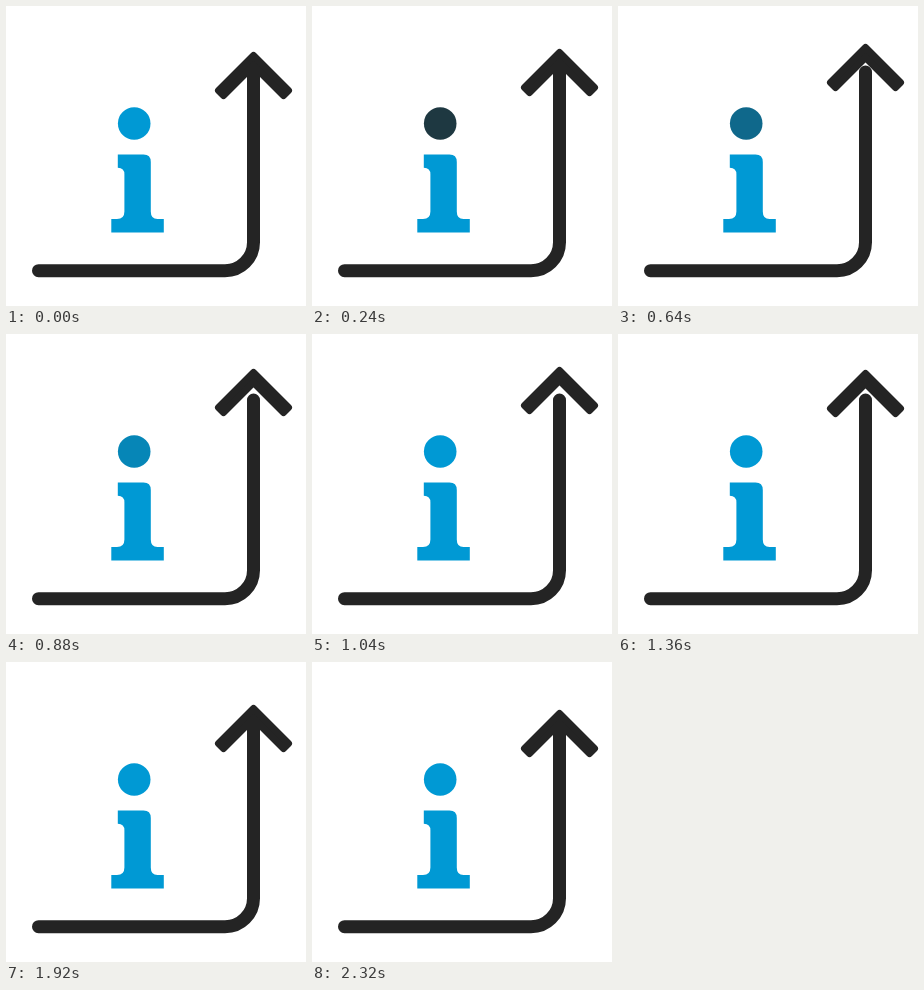
Animation, 300 px wide and 300 px high, one loop 2.4 s. Source, as an HTML page:

```html
<!DOCTYPE html>
<html lang="en">
<head>
<meta charset="utf-8">
<title>Info arrow</title>
<style>
  html, body { margin: 0; width: 100%; height: 100%; overflow: hidden; background: #fff; }
  svg { display: block; width: 100%; height: 100%; }
</style>
</head>
<body>
<svg viewBox="0 0 300 300">
  <g fill="#0099d4">
    <circle id="dot" cx="128.2" cy="117.5" r="16.3"/>
    <path d="M111.8 148.6H137.5Q144.8 148.6 144.8 156V205.5Q144.8 213 151.5 213H157.8V226.4H105.3V213H111Q118.4 213 118.4 205.5V168.5Q118.4 161.8 111.8 161.8Z"/>
  </g>
  <g stroke="#242424" stroke-linejoin="round">
    <path d="M32.5 264.7H219A28.5 28.5 0 0 0 247.5 236.2V66" fill="none" stroke-width="13" stroke-linecap="round"/>
    <path id="head" d="M247.5 49.5L282.5 84.5L277.5 89.5L247.5 59.5L217.5 89.5L212.5 84.5Z" fill="#242424" stroke-width="7"/>
  </g>
</svg>
<script>
  const STEP = 80, STEPS = 30, TOP = 13;
  const dark = [36, 36, 36], blue = [0, 153, 212];
  const dot = document.getElementById("dot");
  const head = document.getElementById("head");
  const start = performance.now();

  function draw(now) {
    const k = Math.floor(Math.max(0, now - start) / STEP) % STEPS;

    // One pixel per step: rise, rest for one step at the top, then sink.
    const y = k <= TOP ? -k : k - TOP - 1 - TOP;
    head.setAttribute("transform", `translate(0 ${y})`);

    // The dot snaps to dark, then fades back to blue while the arrow rises.
    const mix = k === 0 ? 1 : Math.min(1, (k - 1) / 12);
    const rgb = dark.map((c, i) => Math.round(c + (blue[i] - c) * mix));
    dot.setAttribute("fill", `rgb(${rgb})`);

    requestAnimationFrame(draw);
  }
  draw(start);
</script>
</body>
</html>
```
